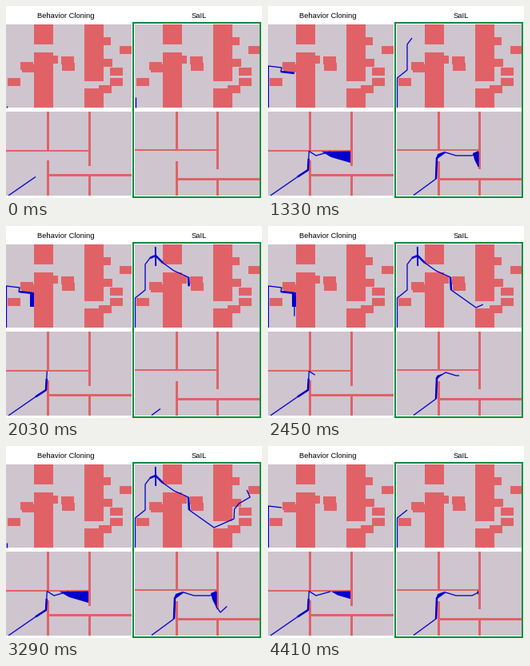
Recreate the animation shown at these times as a matplotlib script. Size 320 px wide and 240 px high, loop 4480 ms.

```python
import numpy as np
import matplotlib.pyplot as plt
from matplotlib.animation import FuncAnimation
from matplotlib.patches import Polygon, Rectangle

W, H, DPI = 320, 240, 80
FRAMES, STEP = 64, 70
PX = 72 / DPI  # points per pixel
FLOOR, WALL, BLUE, GREEN = "#cfc5ce", "#e06267", "#0000cd", "#008c3c"
RIGHT = 161  # x offset of the right column

fig = plt.figure(figsize=(W / DPI, H / DPI), dpi=DPI, facecolor="white")
ax = fig.add_axes([0, 0, 1, 1])
ax.set(xlim=(0, W), ylim=(H, 0))
ax.axis("off")


def box(x, y, w, h, color=WALL):
    ax.add_patch(Rectangle((x, y), w, h, fc=color, lw=0, zorder=1))


def blocks(dx):
    """Two broken columns and a scatter of equal small boxes."""
    for x, gap, size in ((35, 48, 10), (98, 93.5, 9.5)):
        box(dx + x, 23, 24, gap - 23)
        box(dx + x, gap + size, 24, 127 - gap - size)
    for x, y in ((18, 70), (19.5, 72.5), (49.5, 61.5), (69, 63), (70, 71),
                 (2, 90), (115.5, 39), (141.5, 50), (117.5, 66),
                 (130, 77), (130, 89.5), (116, 99)):
        box(dx + x, y, 15.5, 10.3)


def maze(dx, bar, post, stub, gap, shelf, t=3):
    box(dx + 51.3, 132, t, bar + 1 - 132)
    box(dx, bar, post, 2)
    box(dx + post, 132, t, stub - 132)
    box(dx + 51.3, gap, t, 236.5 - gap)
    box(dx + 51.3, shelf, 157 - 51.3, t)
    box(dx + post, shelf, t, 236.5 - shelf)


for dx in (0, RIGHT):
    box(dx, 23, 157, 104, FLOOR)
    box(dx, 132, 157, 104.5, FLOOR)
    blocks(dx)
maze(0, bar=179.7, post=102.7, stub=200, gap=192.5, shelf=210)
maze(RIGHT, bar=178.7, post=101.8, stub=203.5, gap=193.5, shelf=215)

ax.add_patch(Rectangle((159, 21), 159, 217.5, fill=False, ec=GREEN,
                       lw=2 * PX, joinstyle="miter", zorder=5))
for x, label in ((75.2, "Behavior Cloning"), (240.8, "SaIL")):
    ax.text(x, 15.4, label, family="Liberation Sans", size=9.4 * PX,
            ha="center", va="baseline")


def piece(route, lo, hi):
    """Part of a polyline between two fractional vertex indices."""
    idx = np.arange(len(route))
    at = np.r_[lo, idx[(idx > lo) & (idx < hi)], max(lo, hi)]
    return [np.interp(at, idx, axis) for axis in np.transpose(route)]


class Search:
    """A path that follows its route, reaching the vertices given in beats.

    bold: route spans explored more densely; areas: (start, end, corners),
    filled outwards from the first corner.
    """

    def __init__(self, top, period, beats, route, bold=(), areas=(), spur=None):
        self.period, self.beats, self.route = period, np.transpose(beats), route
        self.clip = Rectangle((0, top), 317.5, 104.5, transform=ax.transData)
        self.spans = [(self.line(1.3), 0, len(route) - 1)]
        self.spans += [(self.line(2.5), lo, hi) for lo, hi in bold]
        self.areas = [(self.area(pts), a, b, np.array(pts)) for a, b, pts in areas]
        self.spur = spur
        if spur:
            self.twig = self.line(1.8)

    def line(self, width):
        artist, = ax.plot([], [], color=BLUE, lw=width * PX, zorder=3,
                          solid_joinstyle="round", solid_capstyle="butt")
        artist.set_clip_path(self.clip)
        return artist

    def area(self, pts):
        patch = ax.add_patch(Polygon(pts, fc=BLUE, lw=0, zorder=3))
        patch.set_clip_path(self.clip)
        return patch

    def show(self, i):
        k = i % self.period
        head = np.interp(k, *self.beats)
        for line, lo, hi in self.spans:
            line.set_data(*piece(self.route, lo, min(head, hi)))
        for patch, start, end, pts in self.areas:
            grown = np.clip((k - start) / (end - start), 0, 1)
            patch.set_visible(grown > 0)
            patch.set_xy(pts[0] + grown * (pts - pts[0]))
        if self.spur:
            start, ends = self.spur
            self.twig.set_data(*piece(ends, 0, np.clip((k - start) / 4, 0, 1)))


searches = [
    Search(23, 46, [(0, 0.03), (8, 0.67), (17, 2), (19, 4), (31, 4.4), (40, 5)],
           [(0.5, 127), (0.5, 75), (17, 77), (16, 82), (33, 84), (33, 127)],
           bold=[(3, 4)],
           areas=[(20, 28, [(35, 83), (29.5, 83), (29.5, 100.5), (35, 100.5)])]),
    Search(23, 55, [(0, 0.35), (8, 2), (19, 5), (29, 9.7), (41, 13), (53, 18)],
           [(161.5, 127), (161.5, 90), (174, 80), (174, 72), (174, 48), (180, 40),
            (187, 37), (196, 46), (210, 56), (228, 64), (229, 80), (260, 102),
            (285, 91), (285.5, 79), (291, 72), (305, 64), (297, 46), (302, 37),
            (313, 28)],
           bold=[(5, 7), (9, 10)],
           spur=(20, [(186.8, 26), (187.2, 50)])),
    Search(132, 24, [(0, 1), (5, 3), (8, 3), (15, 5)],
           [(3, 237), (37, 213.5), (50, 205), (51.3, 181.5), (60, 187), (78, 182)],
           bold=[(1, 2.6)],
           areas=[(11, 17, [(103, 181.5), (67, 182), (79, 189), (103, 196)])]),
    Search(132, 25, [(0, 0), (1, 1), (4, 1), (8, 4), (13, 7), (19, 8), (24, 10)],
           [(182, 236.5), (193, 228.5), (210, 216), (211, 190), (222, 183),
            (235, 187), (255, 187), (263, 183), (263, 201), (268, 208), (309, 170)],
           bold=[(2, 3.2)],
           areas=[(6, 12, [(210, 191), (212, 185), (222, 181.5), (216, 188)]),
                  (11, 19, [(263, 181), (256, 184), (258, 192), (263, 202)])]),
]


def update(i):
    for search in searches:
        search.show(i)
    return []


anim = FuncAnimation(fig, update, frames=FRAMES, interval=STEP, repeat=True,
                     repeat_delay=0)
plt.show()
```
